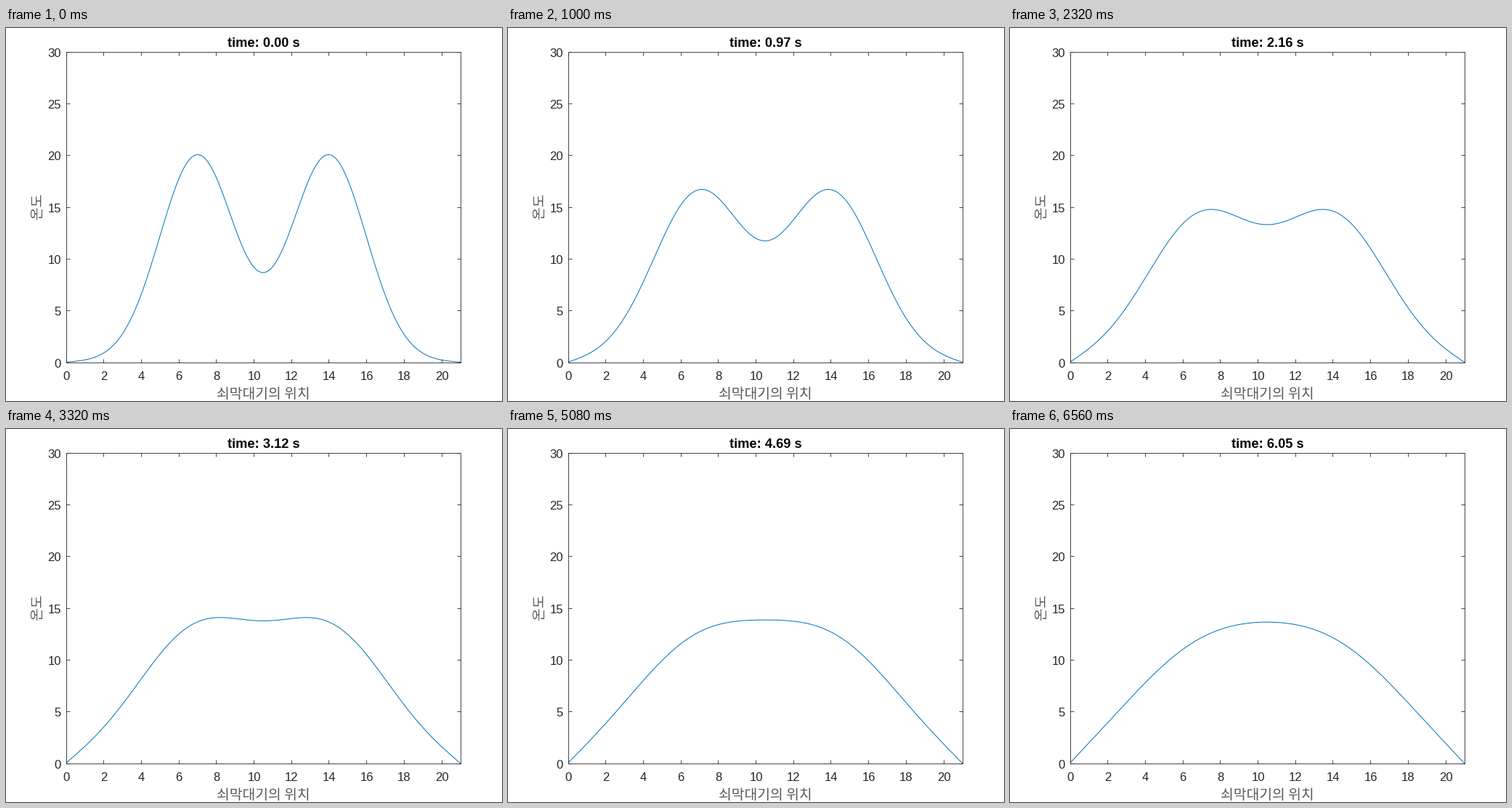
A matplotlib script for the animation above (6.6 s loop, 683 by 514 pixels).

```python
import matplotlib.pyplot as plt
import numpy as np
from matplotlib.animation import FuncAnimation

W, H, DPI = 683, 514, 128
FRAMES, STEP = 165, 40
LEFT, RIGHT, TOP, BOTTOM = 82.5, 625.5, 32.5, 460.5
LENGTH, T_MAX = 21, 30
PX = 72 / DPI
GREY = "0.15"

# The solver's clock runs slightly unevenly over the frames.
CLOCK = ([0, 13, 37, 58, 83, 127, 164],
         [0, 0.49, 1.46, 2.16, 3.12, 4.69, 6.05])


def temperature(x, t):
    """Two spreading heat bumps on a rod whose ends are held at zero."""
    var = 4 + 2 * t
    u = np.zeros_like(x)
    for centre in (7, 14):
        for shift in (-2 * LENGTH, 0, 2 * LENGTH):
            u += np.exp(-(x - centre - shift) ** 2 / (2 * var))
            u -= np.exp(-(x + centre - shift) ** 2 / (2 * var))
    return 20 * np.sqrt(4 / var) * u


fig = plt.figure(figsize=(W / DPI, H / DPI), dpi=DPI, facecolor="white")


def label(x, y, text, size, font="Liberation Sans", ha="center",
          va="baseline", color=GREY, **kw):
    return fig.text(x / W, 1 - y / H, text, fontsize=size * PX, family=font,
                    ha=ha, va=va, color=color, **kw)


ax = fig.add_axes([LEFT / W, 1 - BOTTOM / H,
                   (RIGHT - LEFT) / W, (BOTTOM - TOP) / H])
ax.set(xlim=(0, LENGTH), ylim=(0, T_MAX),
       xticks=range(0, LENGTH, 2), yticks=range(0, T_MAX + 1, 5))
ax.tick_params(direction="in", length=5.4 * PX, width=0.85 * PX, color=GREY,
               top=True, right=True, labelbottom=False, labelleft=False)
for spine in ax.spines.values():
    spine.set(linewidth=0.85 * PX, edgecolor=GREY)

for v in ax.get_xticks():
    label(LEFT + v / LENGTH * (RIGHT - LEFT) + 0.5, 485, f"{v:.0f}", 16.67)
for v in ax.get_yticks():
    label(76, BOTTOM - v / T_MAX * (BOTTOM - TOP) + 7.3, f"{v:.0f}", 16.67,
          ha="right")

HANGUL = dict(size=19.3, font="Noto Sans CJK JP", va="center",
              weight="light", color="0.35")
label(354.5, 505, "쇠막대기의 위치", **HANGUL)
label(43.5, 245, "온도", rotation=90, **HANGUL)
title = label(355, 26, "", 18.33, color="black", weight="bold")

x = np.linspace(0, LENGTH, 211)
curve, = ax.plot(x, np.zeros_like(x), color="#0072BD", linewidth=PX)


def update(i):
    t = np.interp(i, *CLOCK)
    curve.set_ydata(temperature(x, t))
    title.set_text(f"time: {t:.2f} s")
    return curve, title


anim = FuncAnimation(fig, update, frames=FRAMES, interval=STEP,
                     init_func=lambda: update(0), repeat=True, repeat_delay=0)
plt.show()
```
